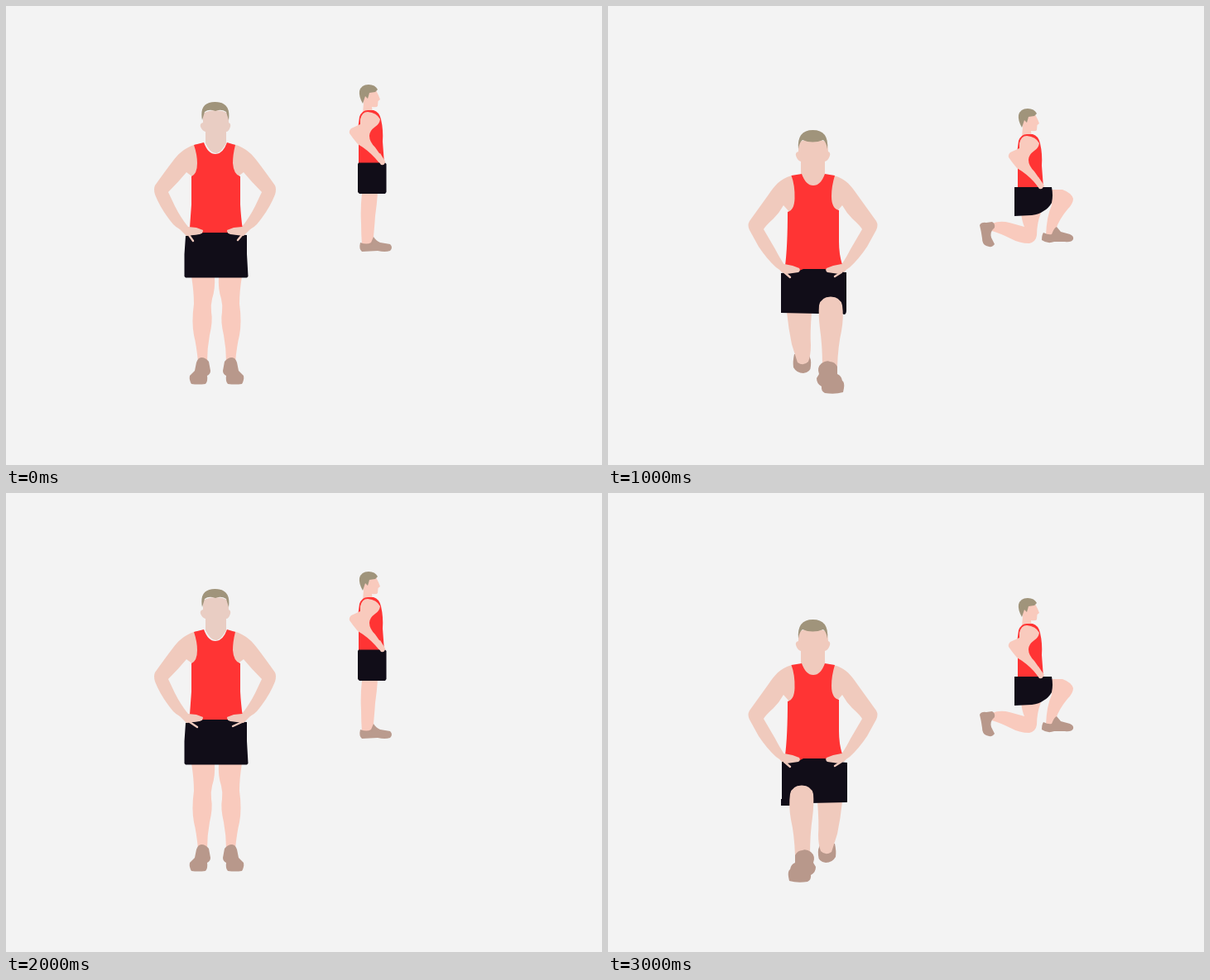
An HTML page without scripts that plays this animation: 720 by 555 pixels, repeating every 4000 ms.

```html
<!DOCTYPE html>
<html lang="en">
<head>
<meta charset="utf-8">
<title>Lunges</title>
<style>
  html, body { margin: 0; width: 100%; height: 100%; overflow: hidden; background: #f3f3f3; }
  svg { display: block; width: 100vw; height: 100vh; }
  .skin { fill: #f0cabd; }
  .pale { fill: #e9cdc3; }
  .pink { fill: #f9cabd; }
  .hair { fill: #a0947b; }
  .top { fill: #ff3434; }
  .shorts { fill: #110d18; }
  .shoe { fill: #b8988b; }
  .thumb { fill: none; stroke: #f0cabd; stroke-width: 2.4; stroke-linecap: round; }
  .stand { animation: half 2s step-end infinite; }
  .lunge { animation: half 2s -1s step-end infinite; }
  .first { animation: early 4s step-end infinite; }
  .second { animation: late 4s step-end infinite; }
  @keyframes half { 0% { visibility: visible; } 50%, 100% { visibility: hidden; } }
  @keyframes early { 0% { opacity: 1; } 50%, 100% { opacity: 0; } }
  @keyframes late { 0% { opacity: 0; } 50%, 100% { opacity: 1; } }
</style>
</head>
<body>
<svg viewBox="0 0 720 555" preserveAspectRatio="none">
  <defs>
    <!-- standing, front -->
    <path id="arm" class="skin" d="M230 167C213 172 207 181 202 187Q192 200 180 217Q178 221 180 228Q187 246 202 264Q208 270 216 272L217 277Q220 279 225 277L234 276Q238 274 238 271L230 268L220 267Q211 256 204 242L196 225Q208 213 218 201L226 207L240 190Z"/>
    <path id="leg" class="pink" d="M224 327H252Q253 342 249 354Q247 362 248 370Q250 381 246 398Q243 414 243 430H232Q230 410 227 398Q224 382 227 360Q227 345 224 327Z"/>
    <path id="shoe" class="shoe" d="M230 431Q232 425 236 425Q241 425 245 430L247 441Q247 445 243 447Q244 454 241 457Q232 458 224 457Q221 452 222 447L228 441Z"/>

    <!-- lunging, front -->
    <path id="bent-arm" class="skin" d="M222 205C207 209 201 218 194 228L171 260Q168 265 171 271L182 291Q192 306 203 316Q208 319 210 322L218 324L230 322Q233 319 230 317L223 314L213 313Q206 302 202 294L188 270Q190 266 200 257Q207 250 212 241L220 250L236 230Z"/>
    <g id="bent-body">
      <path class="skin" d="M230 165Q247 157 265 165L266 176Q269 177 268 181Q266 187 262 188V206Q248 230 233 206V188Q229 187 227 181Q226 177 230 176Z"/>
      <path class="hair" d="M230 173Q228 150 247.500 150Q267 150 265 173Q264 165 260 162Q247 167 235 162Q231 165 230 173Z"/>
      <use href="#bent-arm"/>
      <use href="#bent-arm" transform="matrix(-1 0 0 1 495 0)"/>
      <path class="top" d="M221.500 205L234 203Q239 217 248 217Q257 217 262 203L274 205Q270 218 270 230Q270 245 279 247V285Q279 300 283 313L282 321H215L214 314Q217 290 217 249Q225 247 225.500 233Q226 217 221.500 205Z"/>
    </g>
    <path id="bent-shorts" class="shorts" d="M209 323Q220 323 231 320L236 318H262L268 321L288 322V368Q288 373 285 373L281 371L254 372L209 371Z"/>
    <g id="bent-hands">
      <path class="skin" d="M203 315L213 312L223 314L231 317Q233 320 230 322L216 324Z"/>
      <path class="skin" d="M292 315L282 312L272 314L264 317Q262 320 265 322L279 324Z"/>
      <path class="thumb" d="M213 322L220 328M282 322L274 327"/>
    </g>
    <g id="back-leg">
      <path class="shoe" d="M225 421Q223 430 224 437Q228 444 236 444Q245 443 245 435Q246 427 242 421Z"/>
      <path class="skin" d="M216 370H246Q244 396 245 410Q245 422 242 430Q236 436 229 431Q226 422 222 409Q218 390 216 370Z"/>
    </g>
    <g id="front-leg">
      <path class="skin" d="M255 362Q257 352 269 351.500Q281 352 283 362Q285 376 282 393Q278 410 277 436H259Q259 410 256 390Q254 374 255 362Z"/>
      <path class="shoe" d="M258 432Q264 428 268 430Q274 430 277 436V445Q282 447 283 453Q286 455 285 462L284 467Q274 470 262 468Q257 465 258 460Q252 457 252 450L255 445Q252 437 258 432Z"/>
    </g>

    <!-- side -->
    <g id="side-body">
      <path class="pink" d="M432 105L447 102L450 108L452 113L449.500 115L449 121Q448 123 442 122L443 130L431 130L432 117Z"/>
      <path class="hair" d="M431 118Q426 109 427 103Q429 95 438 95Q446 95 449 101L446 104L439 105L437 112L434 109Z"/>
      <path class="top" d="M425 149L427 134Q430 126 437 126L444 126Q451 128 453 137Q456 150 455 164L457 191H426V168Z"/>
      <path class="pink" d="M428 143L428 137Q430 128 437 128Q448 129 452 137Q451 143 446 146Q439 151 439 157Q439 164 446 171L458 188Q457 193 452 191L446 184Q437 174 425 167Q419 160 415 154Q414 151 417 148Z"/>
    </g>
    <path id="side-hand" class="pink" d="M446 182L452 178L458 188Q458 193 453 192Z"/>
    <g id="side-lunge">
      <path class="pink" d="M499 250H523Q518 263 518 277Q517 285 509 287Q497 287 486 281Q474 275 464 272V263Q474 259 485 262L503 267Q500 260 499 250Z"/>
      <path class="pink" d="M534 222H549Q560 226 562 233Q562 239 555 246Q545 258 541 270L538 277H529Q530 254 536 241Z"/>
      <path class="shoe" d="M449 265Q451 261 457 262L464 261Q468 263 467 268Q461 273 463 280L467 288Q464 293 457 290Q452 288 452 281Q451 273 449 265Z"/>
      <path class="shoe" d="M524 283Q524 277 526 274Q532 277 536 276Q539 268 542 267L547 273L558 276Q563 278 562 282Q560 286 552 285L539 285Q531 288 524 283Z"/>
      <use href="#side-body" transform="translate(69 29)"/>
      <path class="shorts" d="M491 219H536Q538 229 536 238Q532 245 526 248Q521 252 512 253L491 254Z"/>
      <use href="#side-hand" transform="translate(68 29)"/>
    </g>
  </defs>

  <rect width="720" height="555" fill="#f3f3f3"/>

  <g class="stand">
    <path class="pale" d="M238 130Q253 122 269 130L269 141Q272 142 271 146Q269 152 266 152V166Q253 190 241 166V152Q237 151 235 146Q234 142 238 141Z"/>
    <path class="hair" d="M237 138Q233 116 252.500 116Q272 116 269 138L266 128Q260 124 253 127Q245 124 240 128Z"/>
    <use href="#arm"/>
    <use href="#arm" transform="matrix(-1 0 0 1 505 0)"/>
    <path class="top" d="M227 168L239 165Q244 179 253 179Q262 179 267 165L277 168Q274 180 274 190Q275 204 283 206V240Q284 258 286 270L285 276H222V268L224 240V206Q231 203 231 190Q231 180 227 168Z"/>
    <use href="#leg"/>
    <use href="#leg" transform="matrix(-1 0 0 1 509 0)"/>
    <use href="#shoe"/>
    <use href="#shoe" transform="matrix(-1 0 0 1 509 0)"/>
    <path class="shorts" d="M217 278L232 276L238 274H268L275 276L291 277V300L292.500 327L291 328.500H217L215.500 327V300Z"/>
    <path id="hand" class="skin" d="M208 268L220 267L230 268L238 271Q238 275 234 276L218 278Z"/>
    <use href="#hand" transform="matrix(-1 0 0 1 505 0)"/>
    <path class="thumb first" d="M221 277L226 284M285 277L280 283"/>
    <path class="thumb second" d="M222 277L231 283M285 277L274 282"/>

    <path class="pink" d="M430 226H449Q448 240 446 254Q445 269 443 289H430Q429 276 429 262Q428 246 430 226Z"/>
    <path class="shoe" fill-opacity=".97" d="M428 286Q436 289 441 286L444 279Q447 284 452 286L464 288Q468 292 464 296Q458 298 449 296L430 297Q426 294 428 286Z"/>
    <use href="#side-body"/>
    <path class="shorts" d="M426 189.500H458L459.500 191V225L458 227H427L425 225V191Z"/>
    <use href="#side-hand"/>
  </g>

  <g class="lunge">
    <g class="first">
      <use href="#back-leg"/>
      <use href="#bent-body"/>
      <use href="#bent-shorts"/>
      <use href="#front-leg"/>
      <use href="#bent-hands"/>
      <use href="#side-lunge"/>
    </g>
    <g class="second">
      <use href="#back-leg" transform="matrix(-1 0 0 1 499 3)"/>
      <use href="#bent-body" y="3"/>
      <use href="#bent-shorts" transform="matrix(-1 0 0 1 498 3)"/>
      <path class="shorts" d="M209 370H220V378H209Z"/>
      <use href="#front-leg" transform="matrix(-1 0 0 1 503 2)"/>
      <use href="#bent-hands" y="3"/>
      <use href="#side-lunge" y="3"/>
    </g>
  </g>
</svg>
</body>
</html>
```
